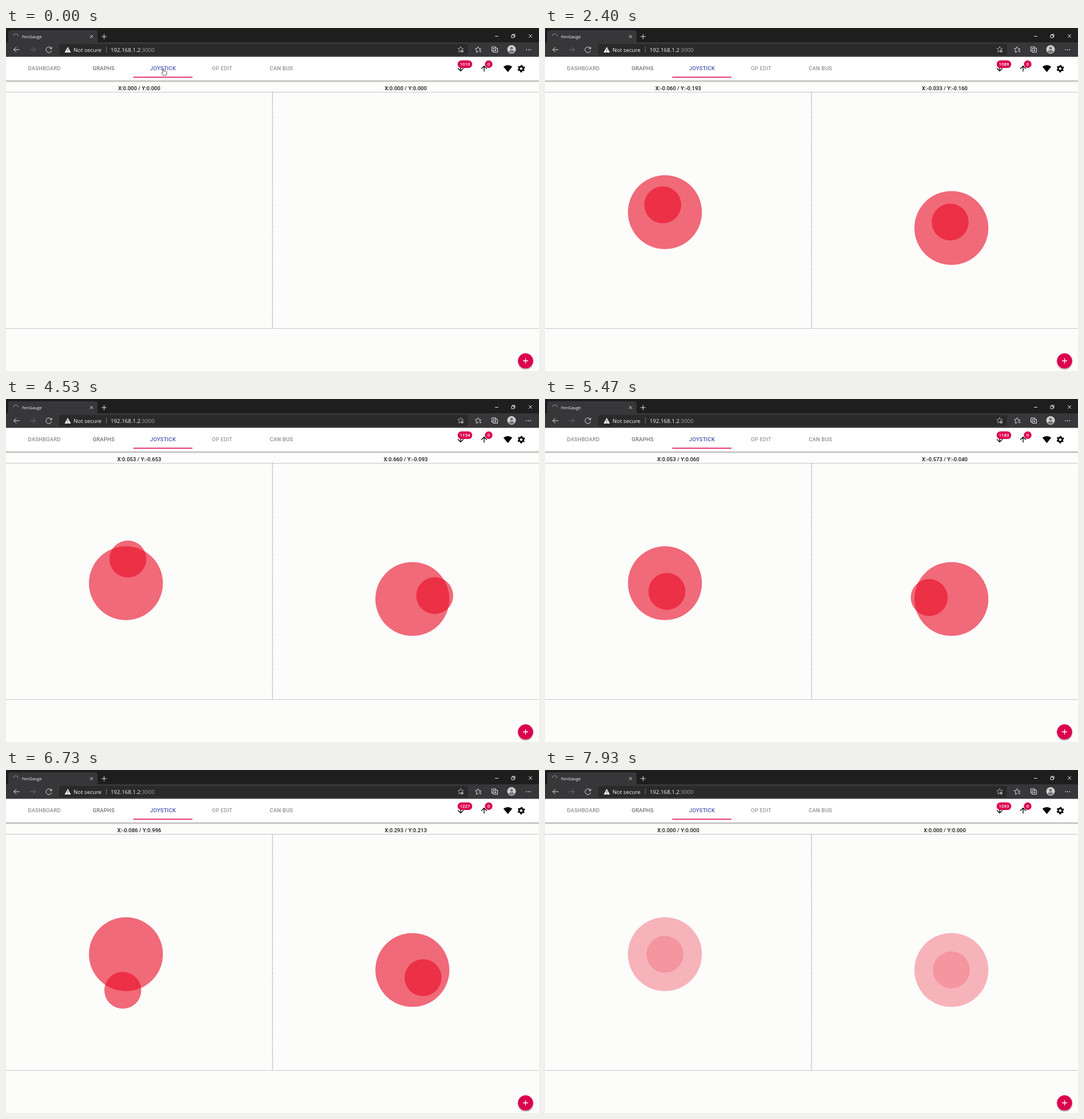
Animation of 932x601 px, one loop 8 s. Source, as an HTML page:

```html
<!DOCTYPE html>
<html lang="en">
<head>
<meta charset="utf-8">
<title>Joystick dashboard</title>
<style>
  html, body { margin: 0; width: 100%; height: 100%; overflow: hidden; background: #fcfcfb; }
  svg { display: block; }
  text { font: 500 9.33px Roboto, sans-serif; }
  .mid text { text-anchor: middle; }
  .tabs text { letter-spacing: .267px; fill: #8c8c8c; }
  .values text { letter-spacing: .066px; fill: #111; }
  .browser text { font: 9.7px "Open Sans", sans-serif; fill: #f4f4f4; }
  .browser .title { font-size: 7.4px; }
  .line { fill: none; stroke: #e4e4e4; stroke-width: 1; }
  .accent { fill: #dc004e; }
  .badges text { font-size: 8px; fill: #fff; }
  .dots { stroke: #8f8fa4; stroke-dasharray: 1 1; }
  .stick circle { fill: rgb(233 10 35 / .6); }
</style>
</head>
<body>
<svg width="932" height="601" viewBox="0 0 932 601">
  <defs>
    <filter id="shadow" x="-30%" y="-30%" width="160%" height="180%">
      <feDropShadow dx="0" dy="1.5" stdDeviation="1.2" flood-opacity=".4"/>
    </filter>
  </defs>

  <path fill="#fff" filter="url(#shadow)" d="M-20 45h972v47h-972z"/>

  <g class="browser">
    <path fill="#1e1e1e" d="M0 0h932v26H0z"/>
    <path fill="#37373a" d="M0 25h932v25.500H0zM4 26V8q0-4 4-4h148q4 0 4 4v18z"/>
    <rect x="93" y="28" width="715" height="20" rx="3" fill="#2a2a2b"/>
    <path class="line" style="stroke:#7fa3ad" d="M13 14a4 4 0 0 1 8 .5"/>
    <text class="title" x="28" y="17.500">FenGauge</text>
    <g class="line">
      <path d="M147 12.500l5 5m0-5l-5 5M171.500 10.500v9m-4.500-4.500h9"/>
      <path d="M855 14.500h6M914 11l6 6m0-6l-6 6M884 12.500h4.500v4.500H884zM885.500 12.500v-1.500h4.500v4.500h-1.500"/>
      <path d="M23.500 38h-10m4.500-4.500l-4.500 4.500 4.500 4.500"/>
      <path stroke="#707070" d="M41.500 38h10m-4.500-4.500l4.500 4.500-4.500 4.500"/>
      <path d="M79.500 36a5 5 0 1 0 .3 3.500M80 33v3.300h-3.500"/>
      <path stroke="#777" d="M175.500 33v10"/>
      <path stroke="#aaa" d="M797 41.500l-2-1.200-3.200 2 .8-3.800-2.600-2.500 3.500-.4 1.500-3.100 1.500 3.100 3.500.4-1.500 1.500"/>
      <path d="M826 41.200l-3.600 1.200.6-3.800-2.500-2.400 3.500-.5 1.600-3 1.600 3M827 36.500h4m-4 2.500h4m-3 2.500h3"/>
      <path d="M852 40.500h-2.500v-7.500h7v2M852 35.500h7.500v7h-7.500zM855.700 37v4m-2-2h4"/>
    </g>
    <circle cx="797.500" cy="40.500" r="2.500" fill="#999"/>
    <path fill="#f4f4f4" d="M108 33l5.500 10h-11z"/>
    <path stroke="#2a2a2b" d="M108 36.500v3.500m0 1v1.300"/>
    <text x="118" y="41.500">Not secure</text>
    <text x="183" y="41.500">192.168.1.2<tspan fill="#a2a2a2">:3000</tspan></text>
    <circle cx="884" cy="37.500" r="7.500" fill="#d0d0d0"/>
    <circle cx="884" cy="35.500" r="2.500" fill="#777"/>
    <path fill="#777" d="M879 42q0-3 5-3t5 3q-5 4-10 0"/>
    <path stroke="#eee" stroke-width="1.500" stroke-dasharray="1.500 2" d="M909.500 38h9"/>
  </g>

  <g class="tabs mid">
    <text x="67" y="74.400">DASHBOARD</text>
    <text x="170.700" y="74.400" style="fill:#707070">GRAPHS</text>
    <text x="274.500" y="74.400" style="fill:#4653ae">JOYSTICK</text>
    <text x="378" y="74.400" style="fill:#999">OP EDIT</text>
    <text x="481.600" y="74.400">CAN BUS</text>
    <path class="accent" d="M222.500 85.500h103.500v1.500h-103.500z"/>
  </g>
  <path transform="translate(787 63) scale(.667)" d="M20 12l-1.400-1.400-5.600 5.600V4h-2v12.200l-5.600-5.600L4 12l8 8z"/>
  <path transform="translate(828 63) scale(.667)" d="M4 12l1.400 1.400L11 7.800V20h2V7.800l5.600 5.600L20 12l-8-8z"/>
  <path d="M877.500 77.300l-7.700-9.600q7.700-5.400 15.400 0z"/>
  <g transform="translate(901 71.200)" fill="none" stroke="#000">
    <circle r="3.600" stroke-width="2.600"/>
    <circle r="5.300" stroke-width="2.400" stroke-dasharray="3 2.550" stroke-dashoffset="1.500" transform="rotate(30)"/>
  </g>
  <g class="badges mid">
    <rect class="accent" x="789.700" y="56.800" width="25.600" height="13.300" rx="6.650"/>
    <circle class="accent" cx="844" cy="63.400" r="6.650"/>
    <text id="count" x="802.500" y="66.300"></text>
    <text x="844" y="66.300">0</text>
  </g>

  <g class="values mid">
    <text id="leftText" x="233" y="108.500"></text>
    <text id="rightText" x="699" y="108.500"></text>
  </g>
  <path class="dots" d="M0 112.500h932M0 526.500h932"/>
  <path class="dots" stroke-width="1.330" style="stroke-dasharray:1.330" d="M466 113v413"/>

  <g id="left" class="stick" transform="translate(209.700 322.800)"><circle r="64.700"/><circle r="32.300"/></g>
  <g id="right" class="stick" transform="translate(710.600 350.400)"><circle r="64.700"/><circle r="32.300"/></g>

  <circle class="accent" cx="908.500" cy="583.300" r="13.200" filter="url(#shadow)"/>
  <path stroke="#fff" stroke-width="1.400" d="M904 583.300h9m-4.500-4.500v9"/>
  <path id="cursor" fill="#fff" stroke="#222" stroke-width=".8" stroke-linejoin="round"
    d="M274 78v-6.200q1-1.500 2 0v3.700q1-.8 1.800.3 1-.6 1.700.4 1.200-.4 1.500.8v3l-1 3h-5l-2.800-4.200q.3-1.500 1.800-.8z"/>
</svg>
<script>
const LOOP = 8000, FPS = 15, REACH = 65;
const TOUCH = 25, RELEASE = 108, FADE = 4;
const $ = id => document.getElementById(id);

// Poses are [step, x, y], one step being 1/15 s; the thumb eases from pose to pose.
const poses = {
  left: [[TOUCH, 0, 0], [35, -.06, -.193], [50, .053, -.653], [74.2, .053, -.653],
    [88.28, .053, .85], [100, -.086, .996], [RELEASE + 3, 0, 0]],
  right: [[TOUCH, 0, 0], [35, -.033, -.16], [52, -.033, -.16], [64.71, .72, -.0956],
    [82.51, -.6, -.0389], [100, .293, .213], [RELEASE + 3, 0, 0]]
};

const ramp = (t, from, to) => Math.min(1, Math.max(0, (t - from) / (to - from)));
const smooth = u => u * u * (3 - 2 * u);

// Each pose adds its eased offset from the one before.
function thumb(keys, step) {
  let [, x, y] = keys[0];
  for (let i = 1; i < keys.length; i++) {
    const [t0, x0, y0] = keys[i - 1], [t1, x1, y1] = keys[i];
    const u = smooth(ramp(step, t0, t1));
    x += (x1 - x0) * u;
    y += (y1 - y0) * u;
  }
  return [x, y];
}

// Messages arrive steadily, with a short busier spell.
const received = step => Math.round(1010 + 2.1146 * Math.min(step, 82)
  + 43.6 * ramp(step, 82, 101) + 2 * Math.max(0, step - 101));

const format = v => (Math.abs(v) < .0005 ? 0 : v).toFixed(3);

function draw() {
  const time = performance.now() % LOOP;
  const step = Math.floor((time + 5) * FPS / 1000) % (LOOP * FPS / 1000);
  const opacity = ramp(step, TOUCH, TOUCH + FADE) - .5 * ramp(step, RELEASE, RELEASE + FADE);
  $('count').textContent = received(step);
  $('cursor').style.display = step < 7 ? '' : 'none';
  for (const side in poses) {
    const [x, y] = thumb(poses[side], step);
    // The readout trails the stick by one step.
    const [shownX, shownY] = thumb(poses[side], step - 1);
    $(side).style.opacity = opacity;
    $(side).lastChild.setAttribute('transform', `translate(${x * REACH} ${y * REACH})`);
    $(side + 'Text').textContent = `X:${format(shownX)} / Y:${format(shownY)}`;
  }
  requestAnimationFrame(draw);
}
draw();
</script>
</body>
</html>
```
